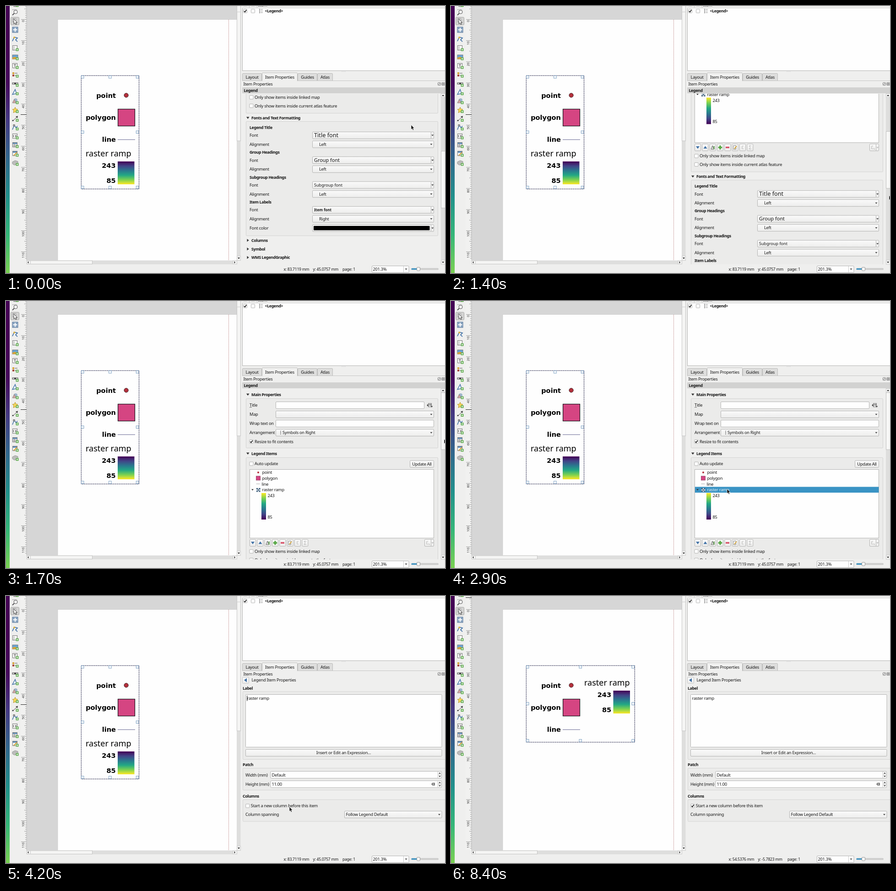
Recreate the animation shown at these times as an HTML page. Size 959x584 px, loop 8.5 s.

```html
<!DOCTYPE html>
<html lang="en">
<head>
<meta charset="utf-8">
<title>Legend columns</title>
<style>
html, body { margin: 0; width: 100%; height: 100%; overflow: hidden; background: #efefee; }
svg { display: block; width: 100vw; height: 100vh; }
text { font: 9.3px "Noto Sans", "Open Sans", sans-serif; letter-spacing: -.27px; fill: #151515; white-space: pre; }
.b { font-weight: 700; font-size: 8.9px; letter-spacing: -.4px; }
.st { font-size: 8.6px; }
.m { text-anchor: middle; }
.f1 { font-size: 12.7px; letter-spacing: 0; }
.f2 { font-size: 10.9px; letter-spacing: 0; }
.f3 { font-size: 9.1px; letter-spacing: 0; }
.f4 { font-size: 8px; font-weight: 700; letter-spacing: 0; }
.lg { font: 700 14.6px "DejaVu Sans", sans-serif; letter-spacing: 0; text-anchor: end; fill: #000; }
.rr { font-size: 18px; letter-spacing: 0; fill: #000; }
.ru { font-size: 7px; letter-spacing: 0; text-anchor: middle; fill: #333; }
</style>
</head>
<body>
<svg id="stage" viewBox="0 0 959 584" preserveAspectRatio="none"></svg>
<script>
const EDGE = '#b4b4b3', BLUE = '#3d6fa5', GREEN = '#58a846', INK = '#333';
const $ = id => document.getElementById(id);

// Drawing helpers; text y is the middle of the line
const rect = (x, y, w, h, fill, stroke = 'none', more = '') =>
  `<rect x="${x}" y="${y}" width="${w}" height="${h}" fill="${fill}" stroke="${stroke}" ${more}/>`;
const path = (d, fill, stroke = 'none', more = '') =>
  `<path d="${d}" fill="${fill}" stroke="${stroke}" ${more}/>`;
const line = (d, stroke, more) => path(d, 'none', stroke, more);
const text = (x, y, s, cls = '') =>
  `<text x="${x}" y="${y + 3.3}" class="${cls}">${s.replace(/</g, '&lt;')}</text>`;
const group = (id, body, more = '') => `<g id="${id}" ${more}>${body}</g>`;

const down = (x, y, c = '#444') => path(`M${x - 2.5} ${y - 1.2}h5l-2.5 3z`, c);
const up = (x, y, c = '#444') => path(`M${x - 2.5} ${y + 1.2}h5l-2.5 -3z`, c);
const side = (x, y, dir) => path(`M${x - dir} ${y - 2.5}v5l${dir * 2.6} -2.5z`, '#333');
const tick = (x, y) => line(`M${x - 2.6} ${y}l2 2.3 3.4 -4.8`, '#111', 'stroke-width="1.5"');
const check = (x, y, on) => rect(x - 4, y - 4, 8, 8, '#fefefe', '#b2b2b1', 'rx=".8"') + (on ? tick(x, y) : '');
const field = (x, y, r) => rect(x + .5, y - 7.5, r - x - 1, 15, '#fefefe', EDGE, 'rx="1.5"');
const button = (x, y, r) => rect(x + .5, y - 7.5, r - x - 1, 15, 'url(#btn)', EDGE, 'rx="1.5"');
const combo = (x, y, r, s = '', tx = 15) => button(x, y, r) + down(r - 6, y) + text(x + tx, y, s);
const box = (x, y, r, b) => rect(x + .5, y + .5, r - x, b - y, '#ebebea', '#d4d4d3', 'rx="1.5"');
const head = (y, s, open) => (open ? path(`M525 ${y - 2}h6.5l-3.2 4.5z`, INK) : path(`M526.5 ${y - 3.2}v6.4l4.2 -3.2z`, INK)) + text(536, y, s, 'b');
const plus = (x, y) => rect(x - 3, y - 3, 6, 6, GREEN, 'none', 'rx="1"') + line(`M${x - 2} ${y}h4M${x} ${y - 2}v4`, '#fff');

const stops = ['#440154', '#414487', '#2a788e', '#22a884', '#7ad151', '#fde725'];
const ramp = (id, cols) => `<linearGradient id="${id}" x2="0" y2="1">` +
  cols.map((c, i) => `<stop offset="${i / (cols.length - 1)}" stop-color="${c}"/>`).join('') + '</linearGradient>';
const defs = '<defs>' + ramp('vir', stops) + ramp('riv', [...stops].reverse()) +
  ramp('btn', ['#fafafa', '#ededec']) +
  ramp('desk', ['#440154', '#440154', '#46085c', '#443983', '#31688e', '#21918c', '#35b779', '#7ad151']) +
  '<clipPath id="view"><path d="M516 192H950V565H516z"/></clipPath>' +
  '<clipPath id="ruler"><path d="M32 0H46V556H32z"/></clipPath></defs>';

function toolbar() {
  const sheet = y => rect(14.5, y - 5.5, 10, 10, '#f6f6f5', '#777');
  const icons = [
    [14, y => `<circle cx="21" cy="${y - 1}" r="4" fill="#f5f5f5" stroke="#555"/>` + line(`M18 ${y + 2}l-4 4`, '#555', 'stroke-width="2"') + line(`M14 ${y - 6}h10`, '#777', 'stroke-dasharray="2 1"')],
    [33, y => rect(10.5, y - 8.5, 18, 17, '#d3d3d2', '#a6a6a5', 'rx="2"') + rect(14.5, y - 5.5, 7, 7, '#eee', '#999') + path(`M17 ${y - 5}v11l2.5 -2 1.8 3.5 1.8 -1 -1.8 -3.2h3.2z`, '#fff', '#333')],
    [52, y => rect(14, y - 6, 12, 12, '#8ea9c4', '#58779a') + line(`M20 ${y - 4.5}v9M15.5 ${y}h9`, '#fff', 'stroke-width="2"')],
    [72, y => line(`M14 ${y + 5}l4 -9 7 2 -4 4 4 4`, BLUE, 'stroke-width="1.7"') + `<circle cx="18" cy="${y - 3}" r="2" fill="#e3b53c"/>`],
    [92, y => sheet(y) + rect(16, y - 4, 3, 8, '#d2d2d1'), 1],
    [112, y => rect(14, y - 5, 12, 9, '#66a5d8', '#777') + path(`M14 ${y + 4}v-3l5 -2 7 2v3z`, '#d7a339'), 1],
    [131, y => sheet(y) + line(`M17 ${y - 3}h5M19.5 ${y - 3}v6`, '#444'), 1],
    [150, y => rect(14, y - 5, 4, 4, '#d5a334') + rect(14, y, 4, 4, '#a64738') + line(`M19 ${y - 3}h6M19 ${y + 2}h4`, '#555'), 1],
    [170, y => rect(14, y - 2, 12, 3, '#eee', '#444') + rect(18, y - 2, 4, 3, '#444'), 1],
    [188.5, y => path(`M14 ${y + 5}l6 -11 3 9z`, '#eef3f8', BLUE, 'stroke-width="1.4"'), 1],
    [208, y => `<circle cx="21" cy="${y - 2}" r="4" fill="#9fb6cc"/>` + path(`M14 ${y + 4}l4 -8 4 8z`, '#d7a5a0', '#888'), 1],
    [227.5, y => path(`M20 ${y - 6}l2 4 4 .5 -3 3 1 4.5 -4 -2 -4 2 1 -4.5 -3 -3 4 -.5z`, '#f4d65d', '#b79a35'), 1],
    [246.5, y => line(`M15 ${y + 5}l9 -9`, '#444') + path(`M26 ${y - 6}l-5 1 4 4z`, '#444') + `<circle cx="15" cy="${y + 4}" r="1.5" fill="#444"/>`, 1],
    [265.5, y => line(`M14 ${y + 5}l4 -10 4 6 3 -4`, BLUE, 'stroke-width="1.5"') + rect(16, y - 6, 3, 3, '#d8d8d8', '#555'), 1],
    [285, y => sheet(y) + line(`M17 ${y - 3}l-1 2 1 3M20 ${y - 3}l3 5M23 ${y - 3}l-3 5`, '#444'), 1],
    [304, y => sheet(y) + rect(15, y - 5, 9, 3, '#6391bd') + line(`M15 ${y}h9M15 ${y + 2.5}h9M18.5 ${y - 5}v9`, '#888'), 1],
    [323, y => sheet(y) + rect(15, y - 5, 9, 3, '#6391bd') + line(`M17 ${y + 4}l7 -7`, '#d59d32', 'stroke-width="2"'), 1],
    [343, y => path(`M14 ${y - 2}l6 -3 6 2v6l-8 2 -4 -3z`, '#bcbcbb', '#999'), 1]
  ];
  return rect(17, -4, 9, 5, '#ddd', '#666') + plus(24.5, -1) +
    icons.map(([y, draw, add]) => draw(y) + (add ? plus(24.5, y + 3.5) : '')).join('');
}

function ruler() {
  const mm = 4.62, zero = 29.5;
  let d = '', nums = '';
  for (let k = -6; k < 114; k++) {
    const y = (zero + k * mm).toFixed(1);
    d += `M45 ${y}h${k % 10 ? k % 5 ? -3 : -5 : -12}`;
    if (k >= 0 && k % 10 === 0) {
      const c = zero + k * mm + (k ? k < 100 ? 5.5 : 7.5 : 3.5);
      nums += `<text class="ru" transform="translate(39.5 ${c.toFixed(1)}) rotate(-90)">${k}</text>`;
    }
  }
  return rect(32, 0, 13, 556, '#f1f1f0') + `<g clip-path="url(#ruler)">${line(d, '#777', 'stroke-width=".7"')}${nums}</g>` +
    line('M45 0V556', '#bbb') + group('mark', line('M32 0H45', '#222'));
}

function canvasArea() {
  return rect(45, 0, 459, 556.5, '#d6d6d6') + rect(113, 29.5, 391, 527, '#fefefe') +
    line('M113 556V29.5H504', '#c3c3c3', 'stroke-width=".6"') +
    line('M486.5 30V556', '#b06a6a', 'stroke-dasharray="1.2 1.1" stroke-width=".9"') +
    rect(504, 0, 8.5, 557, '#dededd') + rect(504.5, -2, 8, 297, '#f5f5f4', '#c5c5c4') +
    rect(504.5, 547, 8, 9.5, '#f3f3f2', '#ccc') + down(508.5, 551.5, '#222') +
    line('M504.5 13h8', '#ccc') +
    rect(45, 557, 459, 8, '#dededd') + rect(45.5, 557, 143, 7.5, '#f5f5f4', '#c5c5c4') +
    line('M53.5 557v8', '#ccc') + rect(495.5, 557, 9, 7.5, '#f3f3f2', '#ccc') + side(48.5, 560.7, -1) + side(499.5, 560.7, 1);
}

function legendFrame(r, b) {
  const x = 164, y = 152, xs = [x, (x + r) / 2 - 3, r - 6.5], ys = [y, (y + b) / 2 - 3.5, b - 6.5];
  let s = rect(x + .3, y + .2, r - x, b - y, 'none', '#26264a', 'stroke-dasharray="3 1"');
  xs.forEach((hx, i) => ys.forEach((hy, j) => {
    if (i !== 1 || j !== 1) s += rect(hx + .5, hy + .5, 5.5, 5.5, '#fefefe', '#6f97bd', 'stroke-width=".9"');
  }));
  return s;
}
const rampItem = (tx, ty, gx, gy) => `<text class="rr" x="${tx}" y="${ty}">raster ramp</text>` +
  `<text class="lg" x="${gx - 4.3}" y="${gy + 14}">243</text><text class="lg" x="${gx - 4.3}" y="${gy + 47}">85</text>` +
  rect(gx, gy, 36.5, 50, 'url(#vir)');
const legend = () =>
  [['point', 201.3], ['polygon', 249], ['line', 297.3]].map(([s, y]) => `<text class="lg" x="240" y="${y}">${s}</text>`).join('') +
  '<circle cx="262.6" cy="195.3" r="4.6" fill="#b4303c" stroke="#3a1c20"/>' +
  rect(244.6, 225.5, 36.9, 37, '#d54582', '#201820', 'stroke-width="1.3"') + line('M244 292.3h38', '#62628f') +
  group('one', legendFrame(290.3, 400) + rampItem(174, 329, 244, 340)) +
  group('two', legendFrame(401, 319.6) + rampItem(291, 195.7, 354.5, 207));

function frame() {
  const tabs = [[516, 559, 'Layout'], [637, 680, 'Guides'], [680, 714, 'Atlas']];
  return rect(516.5, 4.5, 446, 137, '#fefefe', EDGE) + rect(516, 0, 443, 4.5, '#efefee') +
    text(551, -2, 'Item') + line('M531.5 0v4M548.5 0v4', '#ccc') + check(522.5, -4) + check(539.5, -4) +
    check(522.5, 11, true) + check(539.5, 11) +
    line('M553 7.5h2M553 11h2M553 14.5h2', '#777', 'stroke-width="2"') + line('M556 7.5h5M556 11h5M556 14.5h5', '#999') +
    text(565.5, 11, '<Legend>', 'b') + line('M733 143.5h10', '#ccc', 'stroke-dasharray="1 1"') +
    tabs.map(([x, r, s]) => rect(x + .5, 147.5, r - x - 1, 16, '#dededd', '#bcbcbb', 'rx="1.5"') + text((x + r) / 2, 155.5, s, 'm')).join('') +
    line('M516 163.5h443', '#c6c6c5') + rect(559.5, 146, 77, 18.5, '#f1f1f0', '#bcbcbb', 'rx="1.5"') + rect(560, 162, 76, 3, '#efefee') +
    text(598, 155.5, 'Item Properties', 'm') + text(518.5, 170.7, 'Item Properties') +
    [946.5, 955].map(x => rect(x - 3, 167.5, 6, 6, '#eee', '#777', 'rx="1"')).join('') +
    line('M945 172l3 -3M953.3 168.8l3.4 3.4M956.7 168.8l-3.4 3.4', '#333');
}

function scrolled() {
  let s = head(204.5, 'Main Properties', true) + box(524, 213, 943, 321);
  [['Title', 228], ['Map', 248], ['Wrap text on', 268], ['Arrangement', 288]].forEach(([t, y]) => s += text(532, y, t));
  s += line('M532 232.5h5', '#333', 'stroke-width=".7"') + field(589, 228, 914) + combo(589, 248, 935) + field(589, 268, 935) +
    combo(589, 288, 935, 'Symbols on Right') + line('M600 284v8', '#555', 'stroke-width="1.6" stroke-dasharray="1.6 1.5"') +
    rect(922.5, 224, 7, 7.5, '#eee', '#777') + line('M924 226h5M924 228h5', '#555') + path('M919 228l4 -3v6z', '#444') + down(930, 231) +
    check(536, 307.5, true) + text(543, 307.5, 'Resize to fit contents');

  s += head(333.5, 'Legend Items', true) + box(524, 342, 943, 582) + check(536, 356) + text(543, 356, 'Auto update') +
    button(882, 356.5, 935) + text(908.5, 356.5, 'Update All', 'm') +
    rect(532.5, 368.5, 402, 150, '#fefefe', EDGE) + group('pick', rect(533, 406.5, 401.5, 12.7, '#3993c4')) +
    '<circle cx="551" cy="375" r="2.1" fill="#b4303c"/>' + rect(546.5, 383, 9, 9, '#d54582', '#7b3353', 'stroke-width=".7"') +
    line('M546.5 400h8', '#aaa') + path('M536 411.6h5l-2.5 3z', INK) +
    rect(547, 409, 8.5, 8.5, '#cfdbe5') + path('M547 409h3v3h-3zM552.5 409h3v3h-3zM550 412h2.5v2.7H550zM547 414.7h3v2.8h-3zM552.5 414.7h3v2.8h-3z', '#46627c') +
    [['point', 375], ['polygon', 387.7], ['line', 400.3]].map(([t, y]) => text(t === 'line' ? 558.5 : 559.5, y, t)).join('') +
    group('rampRow', text(559.5, 413, 'raster ramp')) + rect(558, 420, 10, 58, 'url(#riv)') +
    text(571.5, 426, '243') + text(571.5, 472.5, '85');
  for (let i = 0; i < 8; i++) s += button(532 + i * 16.33, 529, 546 + i * 16.33);
  s += path('M535 526.5h8l-4 5.5z', BLUE) + path('M551.5 531.5h8l-4 -5.5z', BLUE) +
    path('M568 533l3 -8 3 8z', '#ddd', '#666') + rect(573, 526, 3, 7, '#79a86c') +
    line('M588 524.7v8.6M583.7 529h8.6', GREEN, 'stroke-width="3.4"') + rect(600, 527.3, 8, 3.4, '#d75168') +
    rect(617, 525, 5.5, 8, '#f6f6f5', '#888') + line('M619 532l5 -6', '#d7a52f', 'stroke-width="1.8"') +
    line('M639 526h-3l-1 1.3 2 1.5 -2 1.7 1 1.3h3M656 525.5h-5l3 3.5 -3 3.5h5', '#b4b4b3') +
    button(914, 529, 935) + line('M922 526h-3l-1 1.4 2 1.5 -2 1.7 1 1.3h3M924 530v3h2M928.5 522v14', '#b4b4b3') + down(931.7, 529, '#bbb') +
    check(536, 547.7) + text(543, 547.7, 'Only show items inside linked map') +
    check(536, 566.3) + text(543, 566.3, 'Only show items inside current atlas feature');

  s += head(592.5, 'Fonts and Text Formatting', true) + box(524, 600, 943, 850);
  const fonts = [['Legend Title', 'Title font', 'Left'], ['Group Headings', 'Group font', 'Left'],
    ['Subgroup Headings', 'Subgroup font', 'Left'], ['Item Labels', 'Item font', 'Right']];
  const picker = y => button(669, y, 929) + button(928, y, 935) + down(931.7, y);
  fonts.forEach(([t, f, a], i) => {
    const y = 613.5 + i * 54.35;
    s += text(532, y, t, 'b') + text(532, y + 17.5, 'Font') + picker(y + 17.3) + text(673, y + 17.3 + (i < 2 ? .8 - i * .5 : 0), f, 'f' + (i + 1)) +
      text(532, y + 37, 'Alignment') + combo(669, y + 37, 935, a);
  });
  s += text(532, 834, 'Font color') + picker(833.7) + rect(672, 829, 253.5, 9.5, '#000', 'none', 'rx="1"');
  return s + head(860.5, 'Columns') + head(879.5, 'Symbol') + head(898, 'WMS LegendGraphic');
}

function itemPanel() {
  const spin = y => field(577.5, y, 952) + line(`M943.5 ${y - 7}v14M944 ${y}h8`, '#c5c5c4') + up(947.5, y - 3.5) + down(947.5, y + 3.5);
  return rect(516.5, 177.5, 14, 13.5, 'url(#btn)', '#c5c5c4', 'rx="1.5"') + path('M526 179.8v8.6l-6 -4.3z', BLUE) +
    text(536.5, 184, 'Legend Item Properties') +
    text(517, 201.7, 'Label', 'b') + box(517, 208.5, 963, 357) + rect(523.5, 215.5, 428.5, 115, '#fefefe', EDGE, 'rx="1"') +
    text(526.5, 224, 'raster ramp') + group('caret', rect(526.3, 218, 1, 11.5, '#000')) +
    button(523, 343, 952.5) + text(737.5, 343, 'Insert or Edit an Expression…', 'm') +
    text(517, 369, 'Patch', 'b') + box(517, 376, 963, 424) +
    text(523, 391.3, 'Width (mm)') + spin(391) + text(580.5, 391.3, 'Default') +
    text(523, 411.7, 'Height (mm)') + spin(411.5) + text(580.5, 411.7, '11.00') +
    path('M929 411.5l2.5 -3h5.5v6h-5.5z', '#777') + line('M932 410l3 3M935 410l-3 3', '#fff', 'stroke-width=".8"') +
    text(517, 437.7, 'Columns', 'b') + box(517, 445, 963, 492.5) +
    check(527.8, 459) + group('tick', tick(527.8, 459)) + text(534.8, 459, 'Start a new column before this item') +
    text(523, 478, 'Column spanning') + combo(739, 478, 952.5, 'Follow Legend Default', 3.5);
}

const status = () => '<g id="pos"></g>' + text(735, 575.5, 'page: 1', 'st') +
  rect(799.5, 568.5, 80.5, 14.5, '#fefefe', EDGE, 'rx="1.5"') + line('M868.5 569v14', '#ccc') + down(874, 575.5) + text(801.5, 575.5, '201.3%') +
  rect(885.5, 573.8, 59, 3, '#d2d2d1', '#b5b5b4', 'rx="1.5" stroke-width=".6"') + rect(885.5, 573.8, 14, 3, '#3993c4', 'none', 'rx="1.5"') +
  rect(897.5, 571.5, 7, 7.5, '#f8f8f7', '#999', 'rx="1.5"');

$('stage').innerHTML = defs + rect(0, 0, 959, 584, '#efefee') + rect(0, 0, 8, 584, 'url(#desk)') +
  toolbar() + canvasArea() + ruler() + legend() + frame() +
  group('props', rect(516, 178, 443, 13, '#d2d2d1') + text(519.5, 184.3, 'Legend', 'b') +
    `<g clip-path="url(#view)">${group('body', scrolled())}</g>` +
    rect(950, 192, 9, 373, '#dededd') + rect(950.5, 191.5, 9, 8.5, '#f3f3f2', '#ccc') + rect(950.5, 556, 9, 9, '#f3f3f2', '#ccc') +
    group('bar', rect(950.5, 200.5, 9, 124.5, '#f7f7f6', '#c0c0bf')) + up(954.7, 195.7, '#222') + down(954.7, 560.5, '#222')) +
  group('item', itemPanel()) + status() +
  group('cursor', path('M0 0V10.2L2.3 8.2 3.9 11.8 5.7 11 4.1 7.5H7z', '#111', '#fff', 'stroke-width=".7"'));

// time, x, y
const moves = [
  [0, 885, 260], [900, 948, 421], [1000, 948, 421], [1100, 957, 421], [1200, 957, 421], [1500, 957, 411],
  [1700, 957, 302], [1800, 957, 302], [2000, 881, 361], [2100, 881, 361], [2300, 780, 402], [2500, 640, 449],
  [2600, 607, 440], [2700, 607, 440], [2800, 603, 411], [3200, 603, 411], [3900, 610, 458], [4000, 610, 458],
  [4200, 619, 461], [4900, 619, 461], [5000, 620, 457], [6400, 620, 457], [6600, 788, 262], [6800, 700, 134],
  [6900, 700, 134], [7000, 540, 70], [7100, 365, 3]
];
// time, scroll offset
const scrolls = [[1100, 348], [1200, 346], [1500, 156.5], [1600, 68], [1700, 0]];

function at(keys, t) {
  const i = keys.findIndex(k => k[0] > t);
  if (i < 0) return keys[keys.length - 1].slice(1);
  if (i === 0) return keys[0].slice(1);
  const a = keys[i - 1], b = keys[i], p = (t - a[0]) / (b[0] - a[0]);
  return a.slice(1).map((v, n) => v + (b[n + 1] - v) * p);
}
const show = (id, on) => $(id).setAttribute('display', on ? 'inline' : 'none');
const shift = (id, x, y) => $(id).setAttribute('transform', `translate(${x} ${y})`);

let last = -1;
function render(t) {
  const [x, y] = at(moves, t), [scroll] = at(scrolls, t);
  shift('cursor', x, y);
  show('cursor', t < 7200);
  shift('body', 0, -scroll);
  shift('bar', 0, scroll * .336);
  show('props', t < 3000);
  show('item', t >= 3000);
  show('pick', t >= 2800);
  $('rampRow').firstChild.style.fill = t >= 2800 ? '#e4f0f7' : '';
  show('caret', (t >= 3300 && t < 3700) || (t >= 4200 && t < 4700));
  show('tick', t >= 5000);
  show('one', t < 5100);
  show('two', t >= 5100);
  const moved = t >= 7100;
  shift('mark', 0, moved ? 3.5 : 237.5);
  $('pos').innerHTML = text(606.5, 575.5, moved ? 'x: 54.5376 mm' : 'x: 83.7119 mm', 'st') +
    text(670.5, 575.5, moved ? 'y: -5.7823 mm' : 'y: 45.0757 mm', 'st');
}
function loop() {
  const t = Math.floor(performance.now() % 8500 / 100) * 100;
  if (t !== last) render(last = t);
  requestAnimationFrame(loop);
}
loop();
</script>
</body>
</html>
```
